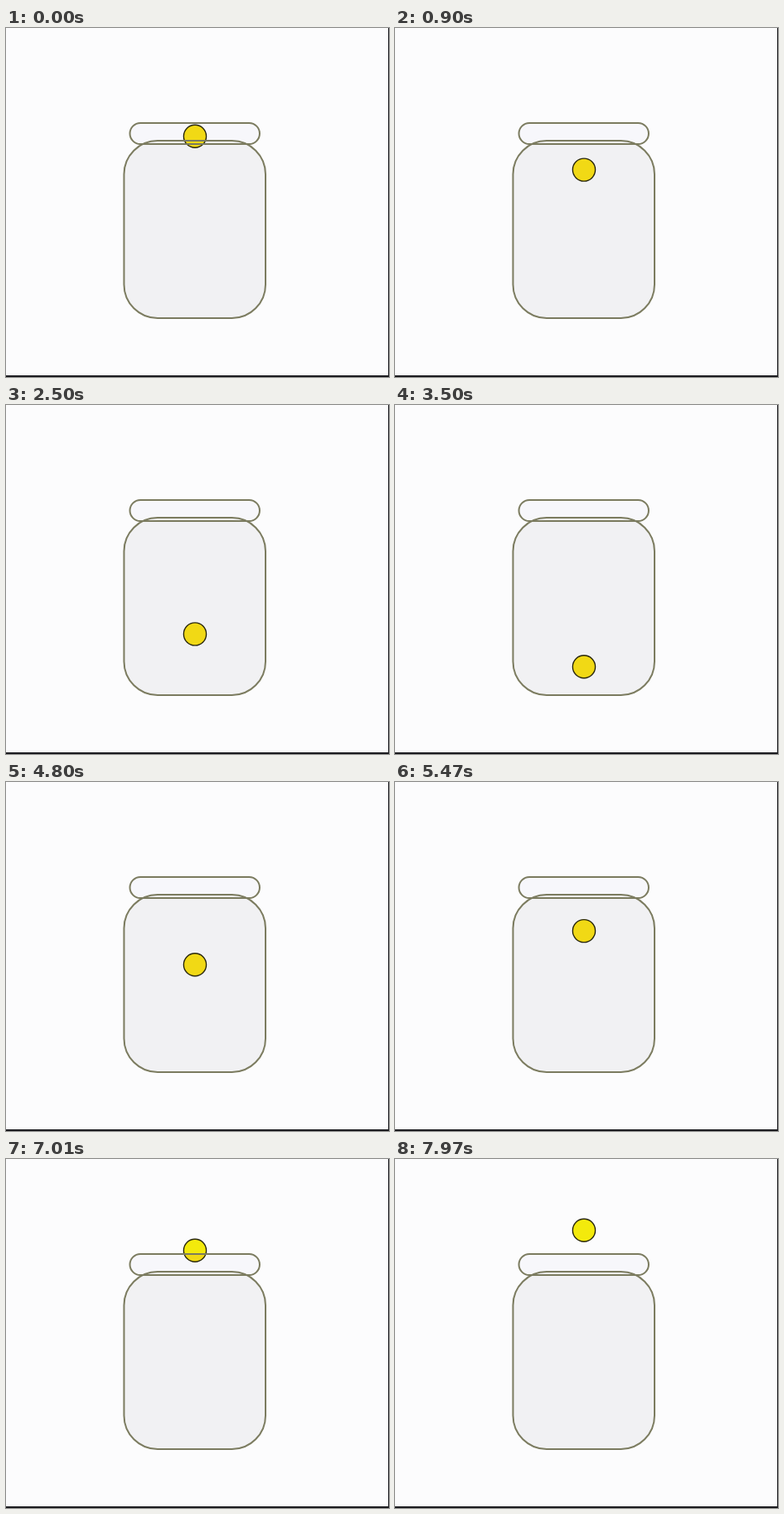
Animation, 456 px wide and 415 px high, one loop 8 s. Source, as an HTML page:

```html
<!DOCTYPE html>
<html lang="en">
<head>
<meta charset="utf-8">
<title>Ball in a jar</title>
<style>
  html, body { margin: 0; width: 100%; height: 100%; overflow: hidden; background: #fcfcfd; }
  svg { display: block; width: 456px; height: 415px; }
  .outline { fill: none; stroke: #7c7c60; stroke-width: 2; }
</style>
</head>
<body>
<svg viewBox="0 0 456 415">
  <defs>
    <rect id="jar" x="140.5" y="134" width="168.5" height="211" rx="40"/>
    <rect id="lid" x="147.5" y="113" width="154.5" height="25" rx="12.5"/>
    <clipPath id="glass"><use href="#jar"/><use href="#lid"/></clipPath>
  </defs>
  <use href="#lid" fill="#f7f7fb"/>
  <use href="#jar" fill="#f1f1f3"/>
  <circle class="ball" cx="225" r="13.5" fill="#f3ea0c"/>
  <g clip-path="url(#glass)"><circle class="ball" cx="225" r="13.5" fill="#f1d915"/></g>
  <circle class="ball" cx="225" r="13.5" fill="none" stroke="#2a2810" stroke-width="1.4"/>
  <use href="#jar" class="outline"/>
  <use href="#lid" class="outline"/>
  <path d="M455 0h1v415h-1zM0 413h456v2H0z" fill="#1c1c20"/>
</svg>
<script>
  const LOOP = 8000, FPS = 30, BOUNCE = 3.23;
  const balls = document.querySelectorAll('.ball');

  const falling = t => 128.7 + 37 * t + 8.2 * t * t;
  const rising = t => {
    const s = t - 3.5;
    return 311.2 - 79.6 * s + 5.26 * s * s + 0.271 * s ** 3;
  };

  function draw(now) {
    const t = Math.floor((now % LOOP) * FPS / 1000 + 0.1) / FPS;
    const y = Math.min(332, t < BOUNCE ? falling(t) : rising(t));
    balls.forEach(ball => ball.setAttribute('cy', y.toFixed(1)));
  }

  function tick() {
    draw(performance.now());
    requestAnimationFrame(tick);
  }
  tick();
</script>
</body>
</html>
```
